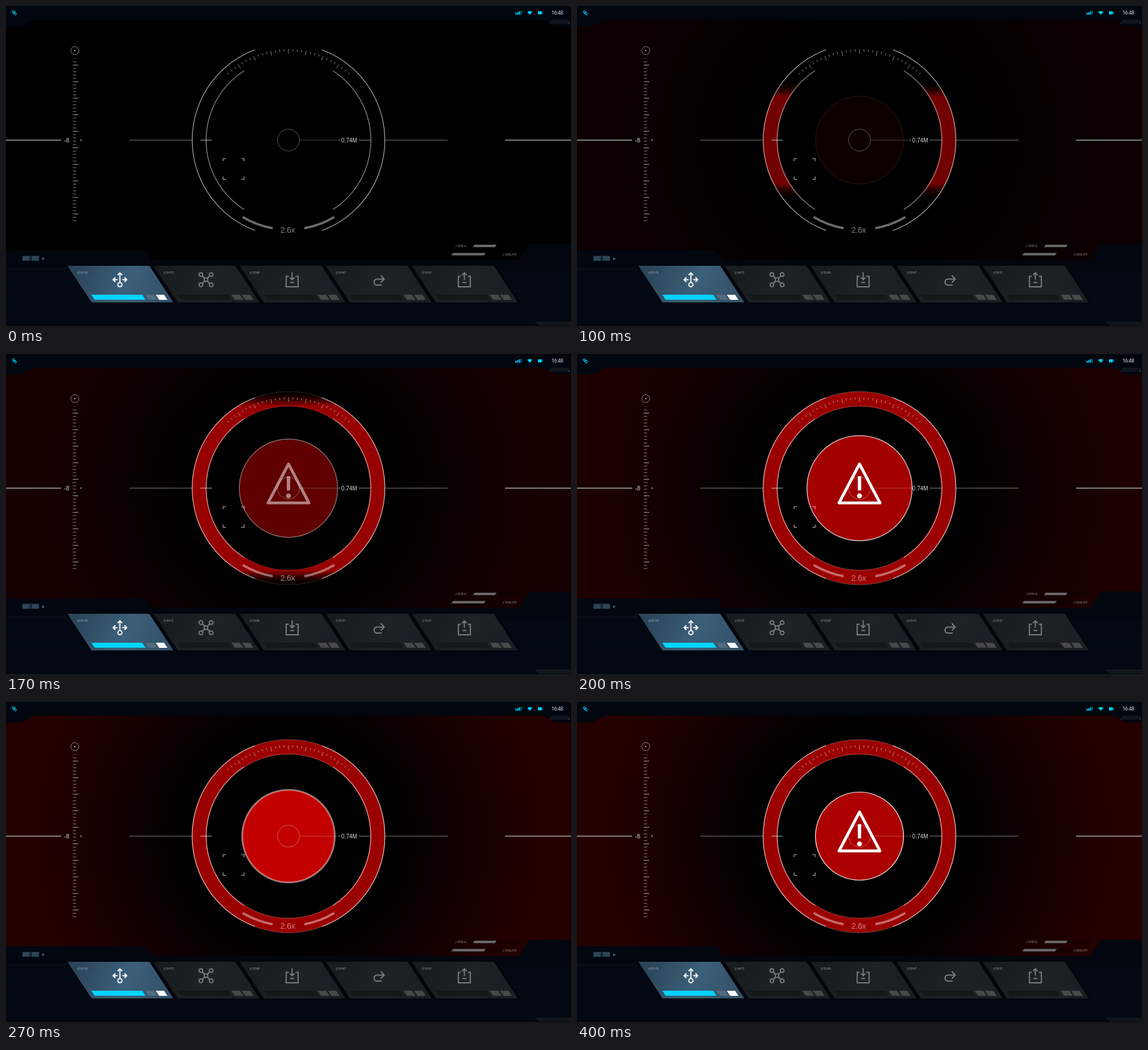
Animation, 994 px wide and 563 px high, one loop 660 ms. Source, as an HTML page with a canvas:

```html
<!DOCTYPE html>
<html lang="en">
<head>
<meta charset="utf-8">
<title>Drone HUD warning</title>
<style>
html, body { margin: 0; width: 100%; height: 100%; overflow: hidden; background: #000; }
canvas { display: block; }
</style>
</head>
<body>
<canvas id="stage" width="994" height="563"></canvas>
<script>
const c = document.getElementById('stage').getContext('2d');
const CX = 497, CY = 236, LOOP = 660, STEP = 100 / 3, LAST_STEP = 12;
const CYAN = '#00d2f5';
const SANS = '"Liberation Sans", Arial, sans-serif', UI = 'Roboto, sans-serif';
const white = a => `rgba(255,255,255,${a})`;
const red = v => `rgb(${Math.round(v)},0,0)`;
const rad = deg => deg * Math.PI / 180;

// Each track holds one value for every second step.
const tracks = {
  bandRed:     [0, 80, 145, 155, 155, 155, 155],
  bandReach:   [0, 63, 146, 200, 200, 200, 200],
  glow:        [0, 8, 18, 28, 36, 36, 36],
  discRadius:  [68, 74, 80.5, 92.5, 81.5, 77.5, 77.5],
  discRed:     [0, 0, 29, 163, 194, 184, 172],
  rimAlpha:    [0, 0, .22, .75, .45, 1, 1],
  rimWidth:    [1, 1, 1, 1.5, 3, 1.2, 1.2],
  ringEdge:    [0, 0, 0, .28, .28, .28, .28],
  symbolAlpha: [0, 0, 0, 1, 0, .8, 1]
};

function poseAt(step) {
  const i = Math.floor(step / 2), f = step / 2 - i, pose = {};
  for (const name in tracks) {
    const v = tracks[name];
    pose[name] = v[i] + ((v[i + 1] ?? v[i]) - v[i]) * f;
  }
  return pose;
}

function poly(points, fill) {
  c.beginPath();
  for (let i = 0; i < points.length; i += 2) c.lineTo(points[i], points[i + 1]);
  c.closePath();
  c.fillStyle = fill;
  c.fill();
}
function slant(x, y, w, h, shift, fill) {
  poly([x, y, x + w, y, x + w + shift, y + h, x + shift, y + h], fill);
}
function line(x1, y1, x2, y2, color, width = 1) {
  c.beginPath();
  c.moveTo(x1, y1);
  c.lineTo(x2, y2);
  c.strokeStyle = color;
  c.lineWidth = width;
  c.stroke();
}
function arc(x, y, r, color, width = 1, from = 0, to = 360) {
  c.beginPath();
  c.arc(x, y, r, rad(from), rad(to));
  c.strokeStyle = color;
  c.lineWidth = width;
  c.stroke();
}
function dot(x, y, r, fill) {
  c.beginPath();
  c.arc(x, y, r, 0, 7);
  c.fillStyle = fill;
  c.fill();
}
function rect(x, y, w, h, fill) {
  c.fillStyle = fill;
  c.fillRect(x, y, w, h);
}
function strokePath(d, color, width) {
  c.strokeStyle = color;
  c.lineWidth = width;
  c.stroke(new Path2D(d));
}
function text(s, x, y, font, color, align = 'left', spacing = 0) {
  c.font = font;
  c.fillStyle = color;
  c.textAlign = align;
  c.textBaseline = 'alphabetic';
  c.letterSpacing = spacing + 'px';
  c.fillText(s, x, y);
}

function drawAlert(p) {
  const glow = c.createRadialGradient(CX, CY, 190, CX, CY, 450);
  glow.addColorStop(0, '#000');
  glow.addColorStop(.65, red(p.glow * .72));
  glow.addColorStop(1, red(p.glow));
  rect(0, 0, 994, 563, glow);

  // Ring band opens vertically from the horizon.
  if (p.bandReach > 0) {
    const reach = p.bandReach, soft = Math.min(.4, 14 / reach);
    const band = c.createLinearGradient(0, CY - reach, 0, CY + reach);
    const solid = red(p.bandRed), clear = 'rgba(0,0,0,0)';
    band.addColorStop(0, clear);
    band.addColorStop(soft, solid);
    band.addColorStop(1 - soft, solid);
    band.addColorStop(1, clear);
    arc(CX, CY, 157, band, 26);
    arc(CX, CY, 170, white(p.ringEdge));
    arc(CX, CY, 144.5, white(p.ringEdge));
  }

  dot(CX, CY, p.discRadius, red(p.discRed));
  arc(CX, CY, p.discRadius, white(p.rimAlpha), p.rimWidth);

  c.globalAlpha = p.symbolAlpha;
  c.lineJoin = 'round';
  strokePath('M497 193.5 461 262H533Z', '#fff', 5);
  rect(494, 215, 6, 25, '#fff');
  dot(497, 249.5, 4.3, '#fff');
  c.globalAlpha = 1;
}

function drawLens() {
  for (const turn of [0, 180]) {
    arc(CX, CY, 169.5, white(.75), 1.1, turn - 69.7, turn + 69.7);
    arc(CX, CY, 145, white(.46), 1.6, turn - 57.4, turn + 57.4);
  }
  arc(CX, CY, 157.5, white(.42), 4, 59.2, 79.8);
  arc(CX, CY, 157.5, white(.42), 4, 100.2, 120.8);
  for (let i = -15; i <= 15; i++) {
    const a = rad(i * 2.8125 - 90), inner = i % 4 ? 156 : 152;
    line(CX + inner * Math.cos(a), CY + inner * Math.sin(a),
         CX + 160 * Math.cos(a), CY + 160 * Math.sin(a), white(.55));
  }
  arc(CX, CY, 19.3, white(.36));
  line(517, 236, 587, 236, white(.27));
  line(587, 233.5, 587, 238.5, white(.3));
  line(621.5, 233.5, 621.5, 238.5, white(.3));
  line(622, 236, 642, 236, white(.55));
  line(666, 236, 777, 236, white(.5));
  line(217, 236, 328, 236, white(.5));
  line(342, 236, 362, 236, white(.75));
  line(0, 236, 97, 236, white(.5), 2);
  line(878, 236, 994, 236, white(.5), 2);
  c.lineJoin = 'miter';
  strokePath('M382 273V268.5H387M414 268.5H419V273M419 300V305H414M387 305H382V300', white(.42), 2);
  text('0.74M', 603.7, 239.7, '10px ' + SANS, '#ddd', 'center');
  text('2.6x', 495.5, 398.5, '14px ' + SANS, white(.5), 'center', -.3);
}

function drawRuler() {
  for (let i = -2; i <= 47; i++) {
    const y = 104 + i * 5.82, major = i % 5 === 0;
    line(117.5, y, major ? 127 : 123.5, y, white(i < -1 ? .2 : major ? .7 : .5));
  }
  arc(121, 78.5, 7, white(.5));
  dot(121, 78.5, 1, '#fff');
  text('-8', 106.8, 239.7, '10px ' + SANS, '#ddd', 'center');
  poly([130, 236, 133, 234, 133, 238], white(.5));
}

function drawHeader() {
  poly([0, 0, 994, 0, 994, 36, 967, 36, 945, 24, 50, 24, 27, 36, 0, 36], '#01060f');
  c.save();
  c.translate(14.6, 12);
  c.rotate(rad(45));
  c.beginPath();
  c.roundRect(-4.3, -1.7, 5, 3.4, 1.7);
  c.roundRect(-.7, -1.7, 5, 3.4, 1.7);
  c.strokeStyle = CYAN;
  c.lineWidth = 1.1;
  c.stroke();
  c.restore();
  for (let i = 0; i < 4; i++) {
    rect(896.3 + i * 3, 12 - i * 1.3, 2.1, 3.3 + i * 1.3, i < 3 ? CYAN : 'rgba(0,210,245,.45)');
  }
  c.beginPath();
  c.moveTo(921.5, 15.5);
  c.lineTo(917, 10.3);
  c.quadraticCurveTo(921.5, 7.2, 926, 10.3);
  c.fillStyle = CYAN;
  c.fill();
  rect(936, 9.3, 6.5, 5.4, CYAN);
  rect(943, 10, 1.4, 4, 'rgba(0,210,245,.6)');
  text('16:48', 959.4, 15.2, '9.3px ' + UI, '#d4d8dc', 'left', -.52);
  for (let x = 956; x < 988; x += 3.6) line(x, 31, x + 6, 24, '#3b4148', .9);
  poly([988, 31, 992, 31, 992, 27], '#3b4148');
}

function drawStatus() {
  slant(822, 420, 86, 4.5, -3, 'rgba(0,0,0,.28)');
  slant(787, 434.6, 82, 4.5, -3, 'rgba(0,0,0,.28)');
  slant(824.5, 420, 38.5, 4.2, -3, '#6b6b6b');
  slant(786.5, 434.6, 57.5, 4.2, -3, '#6b6b6b');
  text('// BTRLVL', 790.5, 424.3, 'italic 5px ' + UI, '#858585', 'left', -.15);
  text('// SGNLSTR', 873.5, 438.8, 'italic 5px ' + UI, '#858585', 'left', -.15);
}

const icons = [
  'M0-12V5M-4-8 0-12 4-8M-4 0H-12M-8-4-12 0-8 4M4 0H12M8-4 12 0 8 4M3.7 8.7A3.7 3.7 0 1 1-3.7 8.7 3.7 3.7 0 1 1 3.7 8.7',
  'M-3-3H3V3H-3ZM-3-3-6.5-6.5M3-3 6.5-6.5M-3 3-6.5 6.5M3 3 6.5 6.5' +
    [[-9, -9], [9, -9], [-9, 9], [9, 9]].map(([x, y]) => `M${x + 3.3} ${y}a3.3 3.3 0 1 0-6.6 0a3.3 3.3 0 1 0 6.6 0`).join(''),
  'M-6-6H-10.5V12.5H10.5V-6H6M0-13V0M-4-4 0 0 4-4M-3.5 5H3.5',
  'M10-1H-3.5A5.5 5.5 0 0 0-3.5 9.5H6M4.5-7.5 10.5-1 4.5 5',
  'M-6-6H-10.5V12.5H10.5V-6H6M0 0V-12M-4-8 0-12 4-8M-3.5 5H3.5'
];

function drawCard(label, i) {
  const active = i === 0;
  c.save();
  c.translate(i * 151.5, 0);
  const fill = c.createLinearGradient(130, 457, 270, 521);
  fill.addColorStop(0, active ? '#2b455a' : '#171c20');
  fill.addColorStop(.55, active ? '#3c5f79' : '#1d2226');
  fill.addColorStop(1, active ? '#34526a' : '#191f25');
  slant(105, 455.5, 150, 67, 44, '#010409');
  slant(108, 457, 144, 64.5, 42.5, fill);
  slant(150, 508, 89.5, 8.7, 6, active ? '#00d5ff' : '#13171a');
  slant(245, 508, 15, 8.7, 6, active ? '#536b7f' : '#47494b');
  slant(263.5, 508, 14.5, 9, 6, active ? '#fff' : '#47494b');
  text('/// ' + label, 125.5, 471.3, '5px ' + UI, active ? '#bac8d2' : '#9a9d9f', 'left', -.18);
  c.translate(200.4, 481.5);
  c.lineJoin = 'miter';
  strokePath(icons[i], active ? '#fff' : '#7b7f81', 2);
  c.restore();
}

function drawConsole() {
  poly([0, 430, 245, 430, 257, 447, 903, 447, 921, 418, 994, 418, 994, 563, 0, 563], '#02060e');
  for (let y = 468; y < 560; y += 3) rect(0, y, 994, 1, 'rgba(10,28,52,.32)');
  line(0, 461.5, 106, 461.5, '#121a22');
  line(0, 464.5, 106, 464.5, '#121a22');
  rect(29, 439.7, 13, 8.5, '#2c4558');
  rect(45, 439.7, 13, 8.5, '#2c4558');
  line(43.5, 438.5, 43.5, 449, '#31475a');
  poly([65, 441.7, 67.2, 446, 62.8, 446], '#4a858f');
  poly([930, 555, 994, 555, 994, 562, 937, 562], '#12171e');
  ['01-15', '04-72', '02-88', '03-47', '05-31'].forEach(drawCard);
}

function frame(now) {
  const step = Math.min(LAST_STEP, Math.floor((now % LOOP + 5) / STEP));
  drawAlert(poseAt(step));
  drawLens();
  drawRuler();
  drawHeader();
  drawConsole();
  drawStatus();
  requestAnimationFrame(tick);
}

const start = performance.now();
function tick() {
  frame(performance.now() - start);
}
tick();
</script>
</body>
</html>
```
